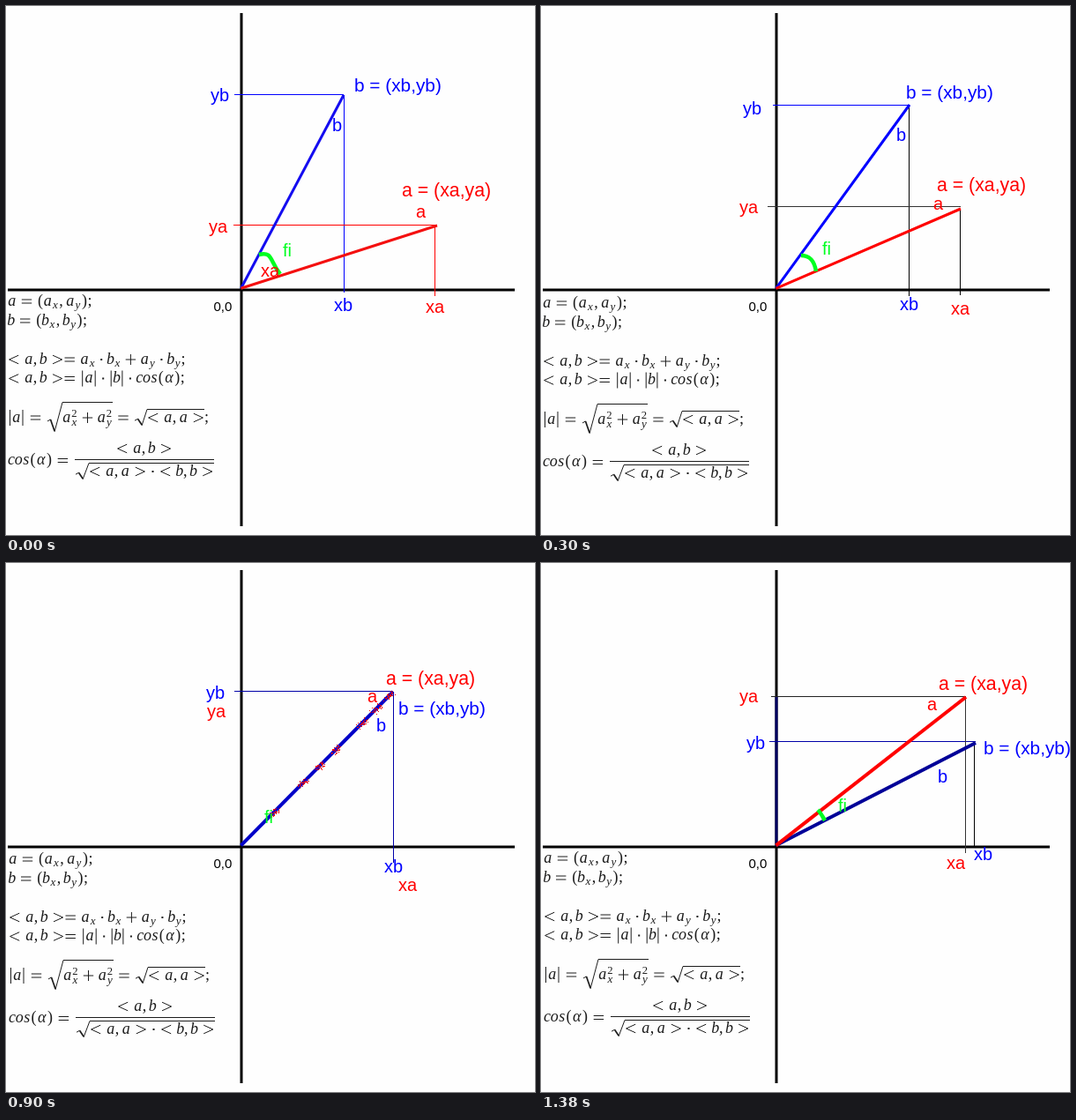
Write an HTML page with a canvas that moves like this. It is 600 px wide and 600 px high and loops after 1500 ms.

```html
<!DOCTYPE html>
<html lang="en">
<head>
<meta charset="utf-8">
<title>Angle between two vectors</title>
<style>
html, body { margin: 0; width: 100%; height: 100%; overflow: hidden; background: #fefefe; }
canvas { display: block; }
</style>
</head>
<body>
<canvas id="stage" width="600" height="600"></canvas>
<script>
const ctx = document.getElementById('stage').getContext('2d');
const STEP = 300;
const ORIGIN = [266.5, 320.3];
const BLUE = '#0000ff', RED = '#ff0000', GREEN = '#00ff20', NAVY = '#0000a8', BLACK = '#000';
const INK = '#1c1c1c';
const SANS = '"Liberation Sans", Arial, sans-serif';
const SERIF = '"Liberation Serif", "Times New Roman", serif';

// Vector: tip, colour, width; guides: [start, level, colour] across and [x, end, colour] down.
const poses = [
  { b: { tip: [383, 101], color: '#140cf0', width: 3, across: [259, 100, BLUE], down: [383, 325, BLUE] },
    a: { tip: [489, 249], color: '#f41010', width: 3, across: [258, 248, RED], down: [486, 329, RED] },
    arc: [287, 282, 303, 278, 299, 290, 311, 304], math: [0, 0] },
  { b: { tip: [418, 112], color: BLUE, width: 3, across: [263, 112, BLUE], down: [417, 329, BLACK] },
    a: { tip: [476, 230], color: RED, width: 3, across: [257, 227, '#333'], down: [475, 328, BLACK] },
    arc: [295, 283, 305, 283, 310, 289, 312, 301], math: [0, 2] },
  { b: { tip: [482, 152], color: BLUE, width: 4, across: [260, 151, BLACK], down: [481, 329, NAVY] },
    a: { tip: [493, 204], color: RED, width: 4, across: [259, 202, RED], down: [491, 323, '#222'] },
    arc: [314, 280, 317, 283, 319, 288, 322, 293], math: [1, 0] },
  { b: { tip: [439, 146], color: '#0000c8', width: 4, across: [259, 145, NAVY], down: [439, 340, NAVY] },
    smudges: [434, 420, 404, 374, 356, 337, 304], math: [1, 1] },
  { a: { tip: [482, 152], color: RED, width: 4, across: [261, 151, '#222'], down: [481, 329, '#333'] },
    b: { tip: [493, 204], color: '#000098', width: 4, across: [259, 202, NAVY], down: [491, 323, BLACK] },
    arc: [314, 280, 317, 283, 319, 287, 322, 292], axisTint: true, math: [1, 0] }
];

const B = 'b = (xb,yb)', A = 'a = (xa,ya)';
const labels = [
  [['yb', 232, 108], [B, 395, 97], ['b', 370, 142], [A, 449, 216], ['a', 465, 240],
   ['ya', 230, 257], ['xb', 372, 346], ['xa', 476, 348], ['xa', 289, 307], ['fi', 314, 284]],
  [['yb', 229, 123], [B, 414, 105], ['b', 403, 153], [A, 449, 210], ['a', 445, 231],
   ['ya', 225, 235], ['xb', 407, 345], ['xa', 465, 350], ['fi', 319, 282]],
  [['yb', 229, 157], [B, 447, 147], ['b', 470, 185], [A, 473, 236], ['a', 456, 204],
   ['ya', 230, 209], ['xb', 459, 344], ['xa', 489, 340], ['fi', 327, 288]],
  [['yb', 227, 154], [B, 445, 172], ['b', 420, 191], [A, 431, 138], ['a', 410, 158],
   ['ya', 228, 175], ['xb', 429, 351], ['xa', 445, 372], ['fi', 293, 295]],
  [['yb', 233, 211], [B, 502, 217], ['b', 450, 249], [A, 451, 144], ['a', 438, 167],
   ['ya', 225, 158], ['xb', 491, 337], ['xa', 460, 347], ['fi', 337, 282]]
];

function line(points, color, width) {
  ctx.beginPath();
  for (let i = 0; i < points.length; i += 2) ctx.lineTo(points[i], points[i + 1]);
  ctx.strokeStyle = color;
  ctx.lineWidth = width;
  ctx.stroke();
}

function write(text, x, y, color, font, align = 'left') {
  ctx.font = font;
  ctx.fillStyle = color;
  ctx.textAlign = align;
  ctx.fillText(text, x, y);
}

function drawAxes(tinted) {
  line([2, 322, 577, 322], BLACK, 3);
  line([267, 8, 267, 590], BLACK, 3);
  if (tinted) line([267, 152, 267, 321], '#000060', 3);
  write('0,0', 235.5, 346, BLACK, '15px ' + SANS);
}

function drawGuides({ tip, across, down }) {
  line([across[0], across[1] + .5, tip[0], across[1] + .5], across[2], 1);
  line([down[0] + .5, tip[1], down[0] + .5, down[1]], down[2], 1);
}

function drawVector({ tip, color, width }) {
  line([...ORIGIN, ...tip], color, width);
}

function drawArc([x, y, ...curve]) {
  ctx.beginPath();
  ctx.moveTo(x, y);
  ctx.bezierCurveTo(...curve);
  ctx.strokeStyle = GREEN;
  ctx.lineWidth = 4.5;
  ctx.stroke();
}

// Scattered red specks along the overlapping vectors.
function drawSmudges(xs, tip) {
  let seed = 7;
  const random = () => (seed = seed * 16807 % 2147483647) / 2147483647;
  const spread = () => random() + random() - 1;
  const slope = (ORIGIN[1] - tip[1]) / (tip[0] - ORIGIN[0]);
  ctx.fillStyle = '#f00808';
  for (const x of xs) {
    const y = ORIGIN[1] - (x - ORIGIN[0]) * slope;
    for (let i = 0; i < 40; i++) {
      const along = spread() * 6, off = spread() * 3;
      ctx.fillRect(Math.round(x + along + off), Math.round(y - along + off), 1, 1);
    }
  }
}

// Advances in pixels for the 18px formula type.
const advance = {
  a: 9.5, b: 7.7, c: 7.8, o: 8.7, s: 8.4, 'α': 11.5, '(': 7, ')': 7, ',': 5, ';': 5,
  '|': 5, '·': 5, '=': 14, '<': 14, '>': 14, '+': 14, ' ': 5, '~': 4, '!': 3
};

function operator(c, x, y) {
  const l = x + 1.3, r = x + 12.7, m = y - 4.5;
  const stroke = points => line(points, INK, 1);
  if (c === '=') { stroke([l, m - 2, r, m - 2]); stroke([l, m + 2, r, m + 2]); }
  if (c === '+') { stroke([l, m, r, m]); stroke([x + 7, m - 6, x + 7, m + 6]); }
  if (c === '<') stroke([r - .5, m - 4.8, l + .3, m, r - .5, m + 4.8]);
  if (c === '>') stroke([l + .5, m - 4.8, r - .3, m, l + .5, m + 4.8]);
  if (c === '|') stroke([x + 2.5, y - 13.5, x + 2.5, y + 4.5]);
  if (c === '·') { ctx.fillStyle = INK; ctx.fillRect(x + 1.5, m - 1, 2, 2); }
}

// '_' sets a subscript, '^' a superscript above it; ' ', '~' and '!' are thick to thin spaces.
function formula(text, x, y) {
  let raised = false;
  for (let i = 0; i < text.length; i++) {
    const c = text[i];
    if (c === '^') {
      write(text[++i], x + 4, y - 5.5, INK, '12.6px ' + SERIF, 'center');
      raised = true;
    } else if (c === '_') {
      write(text[++i], x + 4, y + (raised ? 4.5 : 3), INK, 'italic 13px ' + SERIF, 'center');
      raised = false;
      x += 8;
    } else {
      const w = advance[c];
      if ('=+<>|·'.includes(c)) operator(c, x, y);
      else if (!' ~!'.includes(c)) {
        const style = '(),;'.includes(c) ? '' : 'italic ';
        write(c, x + w / 2, y, INK, style + '18px ' + SERIF, 'center');
      }
      x += w;
    }
  }
}

function root(x, top, bottom, bar, end) {
  const mid = bottom - (bottom - top) * .42;
  line([x, mid + 2, x + 3.5, mid], INK, 1);
  line([x + 3.5, mid, x + 8, bottom - 1], INK, 1.7);
  line([x + 8, bottom, bar, top, end, top], INK, 1);
}

function drawFormulas([dx, dy]) {
  ctx.save();
  ctx.translate(dx, dy);
  formula('a = (a_x,!a_y);', 2, 339.5);
  formula('b = (b_x,!b_y);', 2, 361.5);
  formula('< a,!b >= a_x~·~b_x~+~a_y~·~b_y;', 2, 405.5);
  formula('< a,!b >= |a|~·~|b|~·~cos(α);', 2, 427);

  formula('|a| =', 2, 471.5);
  root(47, 449.5, 483, 64, 121);
  formula('a^2_x~+~a^2_y', 64, 471.5);
  formula('=', 126, 471.5);
  root(146, 457.5, 476, 160, 225);
  formula('< a,!a >;', 160, 471.5);

  formula('cos(α) =', 2, 520);
  line([78, 514.5, 236, 514.5], INK, 1);
  formula('< a,!b >', 125, 506.5);
  root(79, 518.5, 537, 94, 236);
  formula('< a,!a > · < b,!b >', 94, 532.5);
  ctx.restore();
}

function drawLabel([text, x, y]) {
  const red = text.includes('a');
  const color = text === 'fi' ? GREEN : red ? RED : BLUE;
  const size = text.length < 3 ? 20 : red ? 21.3 : 20.8;
  write(text, x, y, color, size + 'px ' + SANS);
}

function draw(index) {
  const pose = poses[index];
  const vectors = [pose.b, pose.a].filter(Boolean);
  ctx.fillStyle = '#fefefe';
  ctx.fillRect(0, 0, 600, 600);
  drawAxes(pose.axisTint);
  vectors.forEach(drawGuides);
  vectors.forEach(drawVector);
  if (pose.arc) drawArc(pose.arc);
  if (pose.smudges) drawSmudges(pose.smudges, pose.b.tip);
  labels[index].forEach(drawLabel);
  drawFormulas(pose.math);
}

let shown = -1;
function tick() {
  const index = Math.floor(performance.now() / STEP) % poses.length;
  if (index !== shown) draw(shown = index);
  requestAnimationFrame(tick);
}
tick();
</script>
</body>
</html>
```
